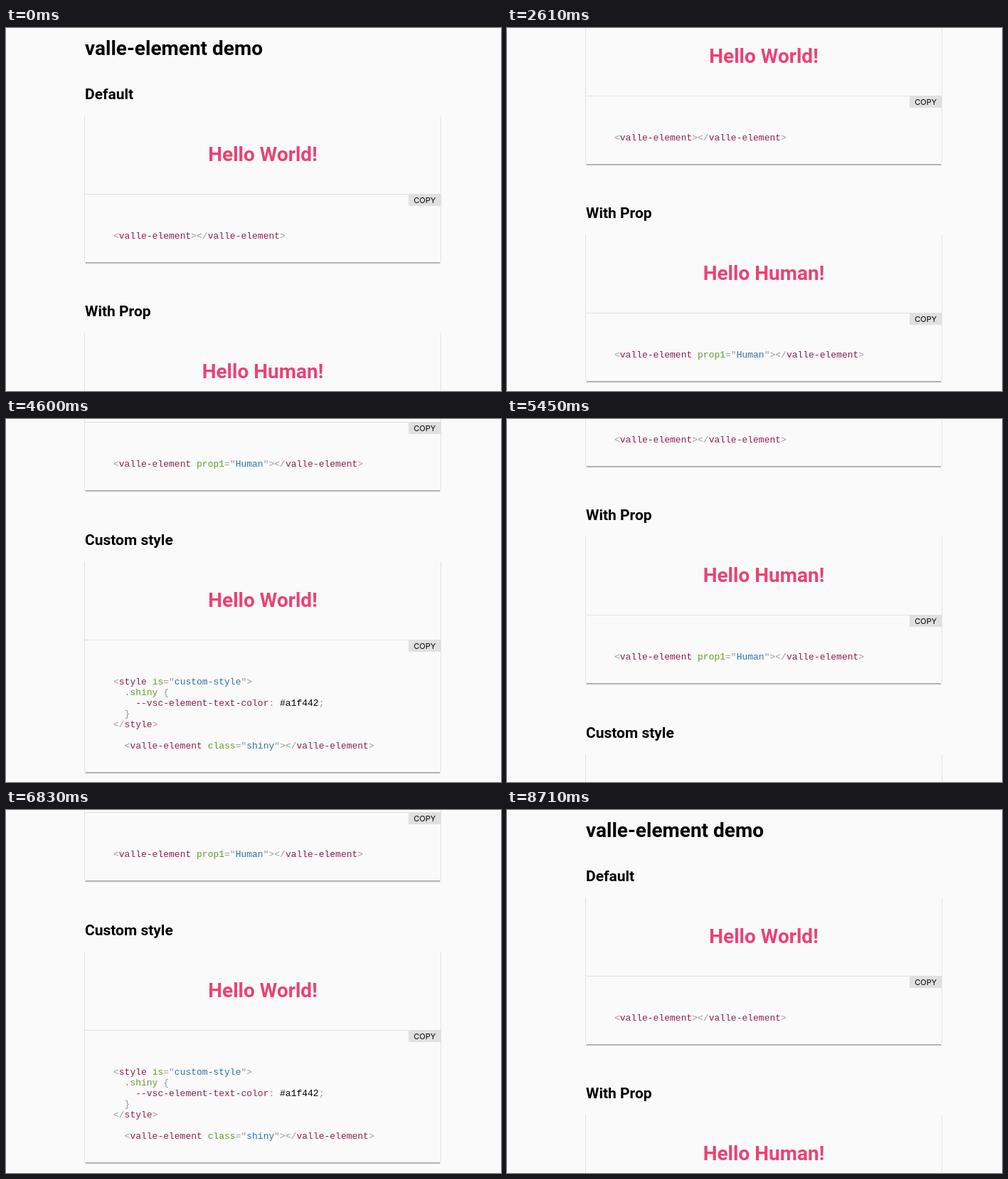
Animation of 696 by 510 pixels, one loop 9130 ms. Source, as an HTML page:

```html
<!DOCTYPE html>
<html lang="en">
<head>
<meta charset="utf-8">
<title>valle-element demo</title>
<style>
  html, body { margin: 0; width: 100%; height: 100%; overflow: hidden; background: #fafafa; }
  svg { display: block; width: 696px; height: 510px; }
  text { white-space: pre; }
  .head { font: bold 21px Roboto, sans-serif; }
  .title { font: bold 28px Roboto, sans-serif; }
  .hello { font: bold 28px Roboto, sans-serif; fill: #ea4273; text-anchor: middle; }
  .copy { font: 11px Inter, sans-serif; text-anchor: middle; }
  .code { font: 13px "Liberation Mono", monospace; fill: #999; }
  .tag { fill: #8c1f52; }
  .attr { fill: #679a2c; }
  .val { fill: #2c73a8; }
  .plain { fill: #000; }
</style>
</head>
<body>
<svg viewBox="0 0 696 510"><g id="page"></g></svg>
<script>
const NS = 'http://www.w3.org/2000/svg';
const page = document.getElementById('page');
const LOOP = 9130;

function add(parent, name, attrs, text) {
  const el = document.createElementNS(NS, name);
  for (const key in attrs) el.setAttribute(key, attrs[key]);
  if (text) el.textContent = text;
  parent.appendChild(el);
  return el;
}

const rect = (x, y, width, height, fill) => add(page, 'rect', { x, y, width, height, fill });
const label = (cls, x, y, text) => add(page, 'text', { class: cls, x, y }, text);

// Code tokens: "kind|text", no kind means punctuation.
function codeLine(y, tokens) {
  const line = label('code', 151, y);
  for (const token of tokens) {
    const [kind, text] = token.includes('|') ? token.split('|') : ['', token];
    add(line, 'tspan', kind ? { class: kind } : {}, text);
  }
}

function card(top, heading, hello, height, lines) {
  label('head', 111, top - 23, heading);
  rect(110, top, 1, height, '#e2e2e2');
  rect(611, top, 1, height, '#e2e2e2');
  label('hello', 361, top + 64, hello);
  rect(111, top + 110, 500, 1, '#e0e0e0');
  rect(566, top + 111, 45, 16, '#e0e0e0');
  label('copy', 588.7, top + 123, 'COPY');
  lines.forEach((tokens, i) => codeLine(top + 173 + i * 15, tokens));
  const bottom = top + height;
  rect(112, bottom, 498, 1, '#a6a6a6');
  rect(111, bottom + 1, 500, 1, '#c4c4c4');
  rect(112, bottom + 2, 498, 1, '#efefef');
}

const close = ['></', 'tag|valle-element', '>'];

label('title', 111, 38, 'valle-element demo');
card(123, 'Default', 'Hello World!', 206, [['<', 'tag|valle-element', ...close]]);
card(428, 'With Prop', 'Hello Human!', 206, [
  ['<', 'tag|valle-element', 'attr| prop1', '="', 'val|Human', '"', ...close]
]);
card(734, 'Custom style', 'Hello World!', 296, [
  ['<', 'tag|style', 'attr| is', '="', 'val|custom-style', '">'],
  ['attr|  .shiny', ' {'],
  ['tag|    --vsc-element-text-color', ':', 'plain| #a1f442', ';'],
  ['  }'],
  ['</', 'tag|style', '>'],
  [],
  ['  <', 'tag|valle-element', 'attr| class', '="', 'val|shiny', '"', ...close]
]);

const linear = p => p;
const smooth = p => p * p * (3 - 2 * p);
const out = k => p => 1 - Math.pow(1 - p, k);

// Scroll keys: time, offset, easing into the key.
const keys = [
  [0, 0], [1590, 0], [1790, 20, out(2)],
  [2150, 20], [2610, 138, out(2)], [2730, 138],
  [3440, 292, out(1.5)], [3490, 292], [3770, 308, out(2)],
  [3980, 308], [4600, 534, out(3)], [4650, 534], [4651, 535],
  [4800, 535], [4920, 536],
  [5090, 536], [5520, 243, smooth], [6060, 465, out(1.8)], [6120, 465],
  [6830, 535, out(3)], [6950, 535],
  [7880, 6, smooth], [7940, -8], [8390, 0, out(2)], [LOOP, 0]
];

function scrollAt(t) {
  const i = keys.findIndex(key => key[0] > t);
  const [t0, from] = keys[i - 1];
  const [t1, to, ease = linear] = keys[i];
  return Math.round(from + (to - from) * ease((t - t0) / (t1 - t0)));
}

const start = performance.now();
function draw() {
  const t = (performance.now() - start) % LOOP;
  page.setAttribute('transform', `translate(0 ${-scrollAt(t)})`);
  requestAnimationFrame(draw);
}
draw();
</script>
</body>
</html>
```
